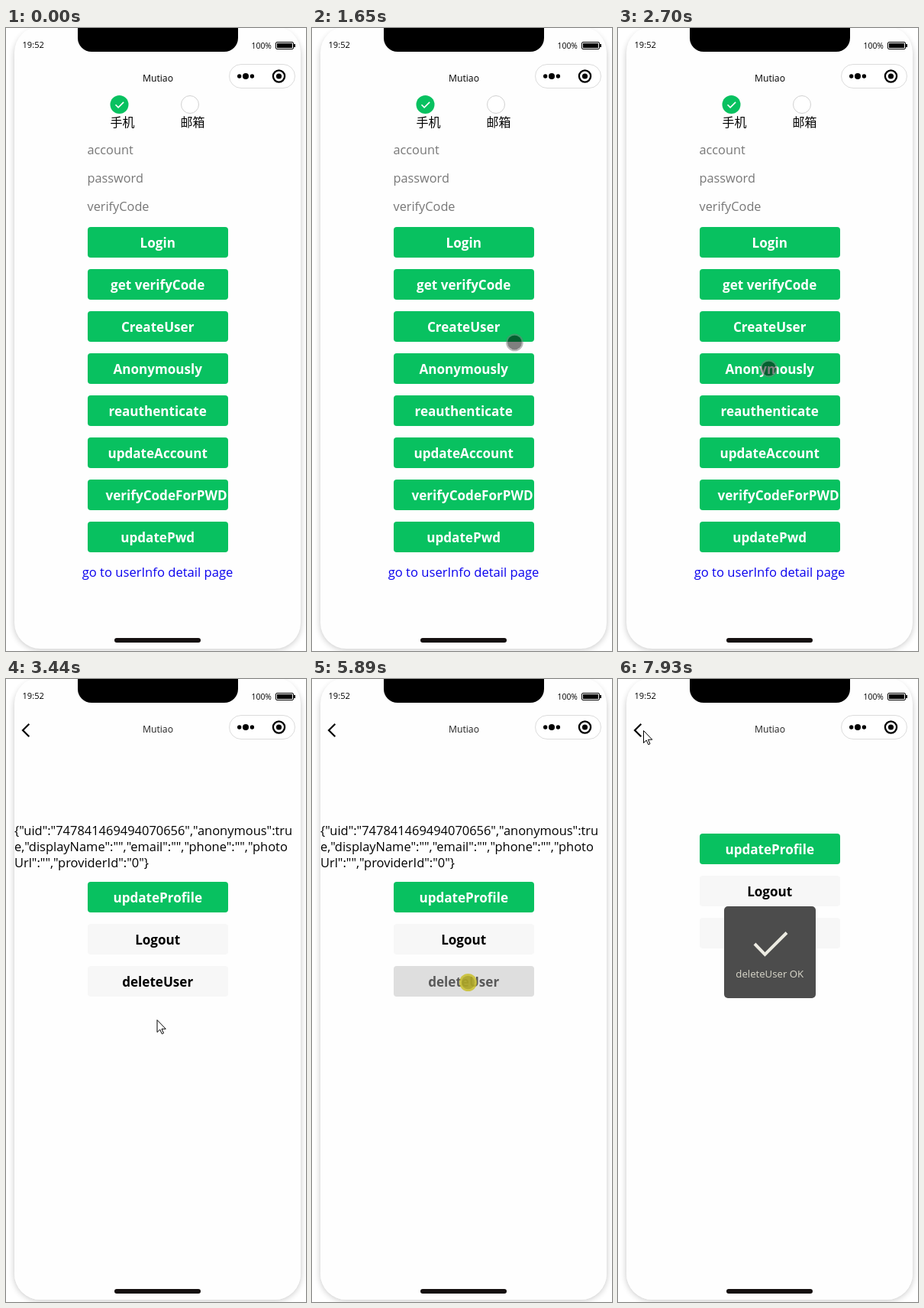
Write an HTML page that moves like this. It is 393x814 px and loops after 8000 ms.

```html
<!DOCTYPE html>
<html lang="zh">
<head>
<meta charset="utf-8">
<style>
  html, body { margin: 0; width: 100%; height: 100%; overflow: hidden; background: #fff; }
  svg { display: block; width: 393px; height: 814px; font-family: "Open Sans", "Noto Sans", sans-serif; }
  .mid { text-anchor: middle; }
  .btn { font-size: 17.1px; font-weight: 700; }
  .hint { font-size: 16.3px; fill: #777; }
  .json { font-size: 16.45px; }
  .cjk { font: 16px "Noto Sans CJK SC", "Noto Sans CJK", sans-serif; }
</style>
</head>
<body>
<svg viewBox="0 0 393 814" xmlns="http://www.w3.org/2000/svg">
  <defs>
    <filter id="soft" x="-10%" y="-10%" width="120%" height="120%"><feGaussianBlur stdDeviation="4"/></filter>
    <clipPath id="screen"><rect x="11" y="0" width="375" height="811" rx="34"/></clipPath>
  </defs>
  <rect width="393" height="814" fill="#fff"/>
  <rect x="11" y="3" width="375" height="809" rx="34" fill="#000" opacity=".23" filter="url(#soft)"/>
  <rect x="11" y="-2" width="375" height="813" rx="34" fill="#fefefe"/>

  <g clip-path="url(#screen)">
    <g id="loginPage">
      <text class="mid" x="199" y="70" font-size="12.2">Mutiao</text>
      <circle cx="148.5" cy="100" r="12" fill="#08c160"/>
      <path d="M143.5 100.3l3.6 3.6 7-7" fill="none" stroke="#fff" stroke-width="1.6"/>
      <circle cx="241" cy="100" r="11.5" fill="#fff" stroke="#d1d1d1"/>
      <text class="cjk" x="136.5" y="129">手机</text>
      <text class="cjk" x="228.5" y="129">邮箱</text>
      <text class="hint" x="106.5" y="165">account</text>
      <text class="hint" x="106.5" y="202">password</text>
      <text class="hint" x="106.5" y="239">verifyCode</text>
      <g id="loginButtons"></g>
      <text class="mid" x="198.5" y="717" font-size="16.6" fill="#0a00ee">go to userInfo detail page</text>
    </g>

    <g id="userPage">
      <rect x="11" y="32" width="375" height="779" fill="#fefefe"/>
      <text class="mid" x="199" y="70" font-size="12.2" fill="#222">Mutiao</text>
      <path d="M30.3 58.8L22 67l8.3 8.2" fill="none" stroke="#000" stroke-width="2.2"/>
      <g id="info" class="json">
        <text x="11" y="204">{"uid":"747841469494070656","anonymous":tru</text>
        <text x="11" y="225">e,"displayName":"","email":"","phone":"","photo</text>
        <text x="11" y="246">Url":"","providerId":"0"}</text>
      </g>
      <g id="userButtons"></g>
    </g>
  </g>

  <g id="toast">
    <rect x="139" y="297" width="120" height="120" rx="5" fill="#4c4c4c"/>
    <path d="M179 346l13.5 14L221 331.5" fill="none" stroke="#ecebe2" stroke-width="4"/>
    <text class="mid" x="198.7" y="390" font-size="13.2" fill="#dad8cb">deleteUser OK</text>
  </g>

  <path d="M94 0H304V13a18 18 0 0 1-18 18H112a18 18 0 0 1-18-18Z"/>
  <text x="21.5" y="26" font-size="11.1">19:52</text>
  <text x="321.5" y="27" font-size="10.4">100%</text>
  <rect x="353.5" y="18.5" width="23" height="9" rx="1.5" fill="none" stroke="#000"/>
  <rect x="355" y="20" width="20" height="6"/>
  <rect x="377" y="21" width="2" height="4"/>

  <rect x="292.5" y="47.5" width="86" height="31" rx="15.5" fill="#fff" stroke="#dcdcdc"/>
  <circle cx="305.7" cy="63" r="2.7"/>
  <circle cx="314" cy="63" r="4"/>
  <circle cx="322.4" cy="63" r="2.7"/>
  <circle cx="357.5" cy="63" r="7.6" fill="none" stroke="#000" stroke-width="2.3"/>
  <circle cx="357.5" cy="63" r="3.6"/>
  <rect x="142" y="797" width="113" height="6" rx="3" fill="#151010"/>

  <g id="cursor">
    <g id="touch">
      <circle r="9.5" fill="#000" fill-opacity=".5"/>
      <circle r="10.4" fill="none" stroke="#777" stroke-opacity=".5" stroke-width="2"/>
    </g>
    <g id="press">
      <circle r="11.5" fill="#c9c02c" fill-opacity=".85"/>
      <circle r="8.8" fill="#8f8a20" fill-opacity=".45"/>
    </g>
    <path id="arrow" d="M.5.5V16.5L4.2 13 6.8 18.7 9 17.7 6.5 12.2H11.8Z" fill="#fff" stroke="#000"/>
  </g>
</svg>
<script>
const LOOP = 8000;
const GREEN = { base: "#08c160", down: "#06ad56", ink: "#fff", inkDown: "rgba(255,255,255,.6)" };
const GREY = { base: "#f7f7f7", down: "#dedede", ink: "#000", inkDown: "rgba(0,0,0,.6)" };
const $ = id => document.getElementById(id);

function make(tag, attrs, parent) {
  const el = document.createElementNS("http://www.w3.org/2000/svg", tag);
  for (const k in attrs) el.setAttribute(k, attrs[k]);
  return parent.appendChild(el);
}

function button(parent, label, y, skin) {
  const box = make("rect", { x: 107, y, width: 184, height: 40, rx: 4 }, parent);
  // a label wider than the button starts at its padding
  const long = label.length > 15;
  const text = make("text", { class: long ? "btn" : "btn mid", x: long ? 130.5 : 198.7, y: y + 27 }, parent);
  text.textContent = label;
  const setDown = down => {
    box.setAttribute("fill", down ? skin.down : skin.base);
    text.setAttribute("fill", down ? skin.inkDown : skin.ink);
  };
  setDown(false);
  return setDown;
}

const loginButtons = ["Login", "get verifyCode", "CreateUser", "Anonymously", "reauthenticate",
  "updateAccount", "verifyCodeForPWD", "updatePwd"]
  .map((label, i) => button($("loginButtons"), label, 260 + 55 * i, GREEN));
const userButtons = ["updateProfile", "Logout", "deleteUser"]
  .map((label, i) => button($("userButtons"), label, 265 + 55 * i, i ? GREY : GREEN));

// pointer moves: number of steps and points of [ms, x, y]
const moves = [
  { steps: 6, path: [[960, 340, 802], [1050, 358, 762], [1144, 386, 712], [1190, 430, 680]] },
  { steps: 18, path: [[1370, 390, 475], [1510, 320, 420], [1600, 283, 406], [1650, 265, 411],
    [1800, 230, 427], [1950, 209, 438], [2160, 197.5, 445]] },
  { steps: 4, path: [[4920, 195, 432], [4970, 197, 414], [5020, 203, 401], [5070, 207.5, 395.5]] },
  { steps: 2, path: [[5250, 206, 395.5], [5300, 204.5, 396.5]] },
  { steps: 18, path: [[7140, 206, 402], [7280, 180, 360], [7460, 110, 240], [7620, 50, 150],
    [7740, 23, 106], [7830, 25, 84], [7930, 33, 67]] }
];

function along(path, t) {
  let i = 1;
  while (i < path.length - 1 && path[i][0] < t) i++;
  const [t0, x0, y0] = path[i - 1], [t1, x1, y1] = path[i];
  const k = Math.min(1, (t - t0) / (t1 - t0));
  return [x0 + (x1 - x0) * k, y0 + (y1 - y0) * k];
}

function pointer(t) {
  const move = moves.filter(m => m.path[0][0] <= t).pop();
  if (!move) return [-50, -50 + 200];
  const start = move.path[0][0], end = move.path[move.path.length - 1][0];
  const step = (end - start) / (move.steps - 1);
  const n = Math.min(move.steps - 1, Math.floor((t - start) / step + 1e-6));
  return along(move.path, start + n * step);
}

const within = (t, a, b) => t >= a && t < b;
const show = (id, on) => $(id).setAttribute("display", on ? "inline" : "none");
const shift = (id, x, y) => $(id).setAttribute("transform", `translate(${x} ${y})`);

function draw(t) {
  loginButtons[3](within(t, 2390, 2700));
  userButtons[2](within(t, 5890, 6450));

  const slide = Math.min(1, (Math.floor((t - 3260) / 60) + 1) / 4);
  show("loginPage", t < 3440);
  show("userPage", t >= 3260);
  shift("userPage", 375 * (1 - slide) ** 2, 0);

  const deleted = t >= 6680;
  show("info", !deleted);
  show("toast", deleted);
  shift("userButtons", 0, deleted ? -63 : 0);

  const [x, y] = pointer(t);
  const arrow = within(t, 3260, 4920) || y < 88;
  const pressed = within(t, 2340, 2670) || within(t, 5760, 6400);
  shift("cursor", x, y);
  show("arrow", arrow);
  show("press", !arrow && pressed);
  show("touch", !arrow && !pressed);
}

const began = performance.now();
function tick() {
  draw((performance.now() - began) % LOOP);
  requestAnimationFrame(tick);
}
tick();
</script>
</body>
</html>
```
